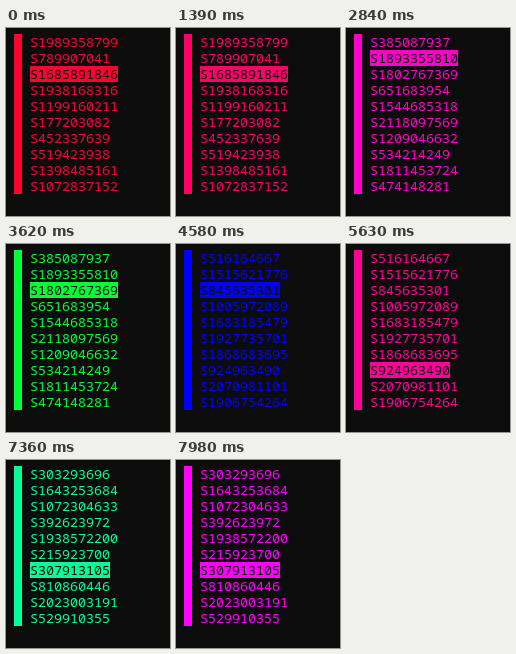
Recreate the animation shown at these times as an HTML page. Size 164 px wide and 188 px high, loop 8 s.

```html
<!DOCTYPE html>
<html lang="en">
<head>
<meta charset="utf-8">
<title>Rainbow menu</title>
<style>
  html, body { margin: 0; width: 100%; height: 100%; overflow: hidden; background: #0c0c0c; }
  #menu {
    position: absolute; left: 8px; top: 6px; height: 160px;
    border-left: 8px solid var(--tint); padding-left: 8px;
    color: var(--tint);
    font: 13.3333px/16px "Noto Sans Mono", "DejaVu Sans Mono", monospace;
  }
  #menu div { width: fit-content; height: 16px; white-space: pre; }
  #menu .selected { background: var(--tint); color: #0c0c0c; }
</style>
</head>
<body>
<div id="menu"></div>
<script>
const LOOP = 8000;
const KEY_REPEAT = 220;
const HUE_STEP = 12;

// The selection leaves the first row at `start` and moves one row per key repeat
const pages = [
  { start: 1500, first: 2, last: 1, codes: "S1989358799 S789907041 S1685891846 S1938168316 S1199160211 S177203082 S452337639 S519423938 S1398485161 S1072837152" },
  { start: 2520, first: 0, last: 2, codes: "S385087937 S1893355810 S1802767369 S651683954 S1544685318 S2118097569 S1209046632 S534214249 S1811453724 S474148281" },
  { start: 4080, first: 0, last: 7, codes: "S516164667 S1515621776 S845635301 S1005972089 S1683185479 S1927735701 S1868683695 S924963490 S2070981101 S1906754264" },
  { start: 5830, first: 0, last: 6, codes: "S303293696 S1643253684 S1072304633 S392623972 S1938572200 S215923700 S307913105 S810860446 S2023003191 S529910355" }
];

// Repaints speed up while keys are pressed: [time, repaints so far]
const tempo = [[0, 0], [850, 16], [1390, 31], [2110, 49], [3620, 78], [5630, 122], [6670, 147], [7980, 184], [LOOP, 184]];

const menu = document.getElementById("menu");
const rows = Array.from({ length: 10 }, () => menu.appendChild(document.createElement("div")));

function repaintCount(t) {
  const next = tempo.findIndex(([time]) => time > t);
  const [t0, n0] = tempo[next - 1];
  const [t1, n1] = tempo[next];
  return Math.floor(n0 + (n1 - n0) * (t - t0) / (t1 - t0));
}

function selectedRow({ start, first, last }, t) {
  const presses = Math.max(0, Math.floor((t - start) / KEY_REPEAT));
  const distance = last - first;
  return first + Math.sign(distance) * Math.min(presses, Math.abs(distance));
}

function draw() {
  const t = performance.now() % LOOP;
  const page = pages.findLast(({ start }) => start <= t) ?? pages[0];
  const selected = selectedRow(page, t);
  const codes = page.codes.split(" ");
  menu.style.setProperty("--tint", `hsl(${348 - HUE_STEP * repaintCount(t)}, 100%, 50%)`);
  rows.forEach((row, i) => {
    row.textContent = codes[i];
    row.className = i === selected ? "selected" : "";
  });
  requestAnimationFrame(draw);
}

draw();
</script>
</body>
</html>
```
